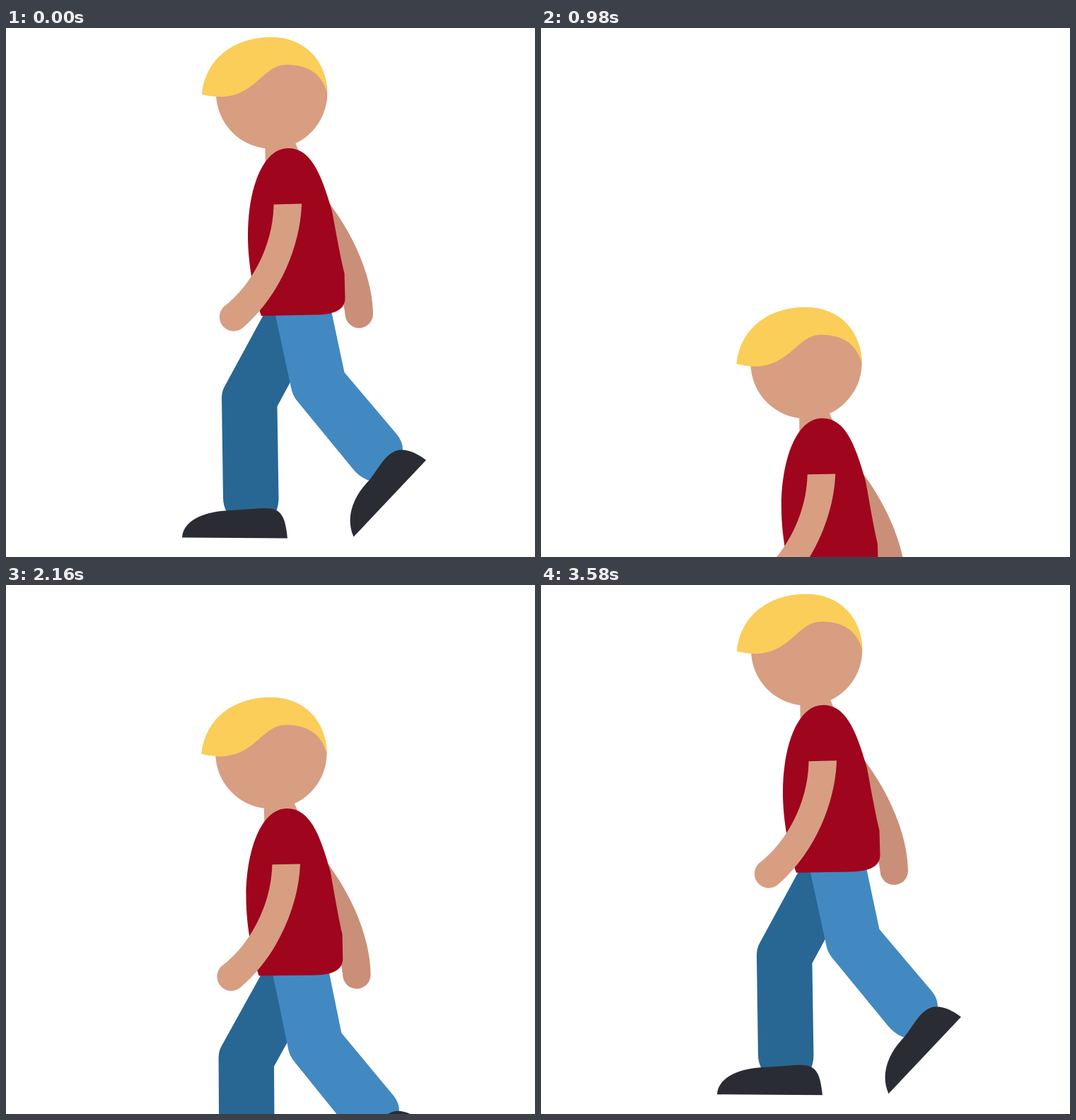
An HTML page for the animation above (3.6 s loop, 748 px wide and 748 px high).

```html
<!DOCTYPE html>
<html lang="en">
<head>
<meta charset="utf-8">
<title>Walking figure</title>
<style>
  html, body { margin: 0; width: 100%; height: 100%; overflow: hidden; background: #fff; }
  svg { display: block; width: 100vw; height: 100vh; }
  .skin { fill: #d79e82; }
  .shade { fill: #ca8f78; }
  .shirt { fill: #9f051d; }
  .near { fill: #4289c1; }
  .far { fill: #286694; }
  .shoe { fill: #292d33; }
  .hair { fill: #fbcd59; }
</style>
</head>
<body>
<svg viewBox="0 0 748 748">
  <g id="walker">
    <path class="shade" d="M455 245C490 290 518 350 519 404A19.7 19.7 0 0 1 479.6 405L470 345L445 260Z"/>
    <path class="skin" d="M366 150H405L409 162L414 174V200H367Z"/>
    <path class="far" d="M366 402L309 507Q305 514 305 524L307 664Q307 676 313 686H381Q385.5 676 385.5 665L383.5 535L404 497L395 402Z"/>
    <path class="near" d="M380 402L403 508Q405 520 413 529L491 624Q501 636 514 640L561 600Q562 586 553 575L478.5 487L460 400Z"/>
    <path class="shoe" d="M249 720.5C250 697 280 683 318 682C345 681 352 679 365 679C389 678 395 690 398 721.5Z"/>
    <path class="shoe" d="M594 611C583 603 572 596.5 559 596.5C538 597 528 622 514 639C492 661 479 691 491.5 719.5Z"/>
    <path class="shirt" d="M399 170C362 170 342 230 342 293C342 335 351 378 361 407L440 405.6C465 405 479.5 398 479.5 382L478.5 347C472 320 465 280 461 259C445 203 430 170 399 170Z"/>
    <path class="skin" d="M378.5 249.5L418 248.5C417 300 392 374 336 423A19.7 19.7 0 0 1 308 394C350 362 378 304 378.5 249.5Z"/>
    <circle class="skin" cx="375.7" cy="92" r="78.7"/>
    <path class="hair" d="M277 94C282 42 324 13 375 13C424 13 454 48 454.3 92C446 62 424 52 396 52C364 52 352 97 304 97.300C294 97.300 285 96 277 94Z"/>
  </g>
</svg>
<script>
  const LOOP = 3600, STEP = 20;
  const walker = document.getElementById('walker');

  // Cubic easing from 0 to 1 with given start and end slopes
  const ease = (x, a, b) =>
    x * x * (3 - 2 * x) + a * x * (1 - x) ** 2 + b * x * x * (x - 1);

  // Runs 0 to 1 and back; each way takes `half` ms and eases afresh
  function swing(t, half, a, b) {
    const n = t / half;
    const p = ease(n % 1, a, b);
    return Math.floor(n) % 2 ? 1 - p : p;
  }

  function draw(t) {
    const drop = 389 * swing(t, 900, 0.04, -0.09);
    const tilt = 2 * swing(t, 600, 1.15, 0);
    walker.setAttribute('transform',
      `translate(0 ${drop.toFixed(2)}) rotate(${tilt.toFixed(3)})`);
  }

  const start = performance.now();
  function tick() {
    const t = (performance.now() - start) % LOOP;
    draw(Math.floor(t / STEP) * STEP);
    requestAnimationFrame(tick);
  }
  draw(0);
  requestAnimationFrame(tick);
</script>
</body>
</html>
```
